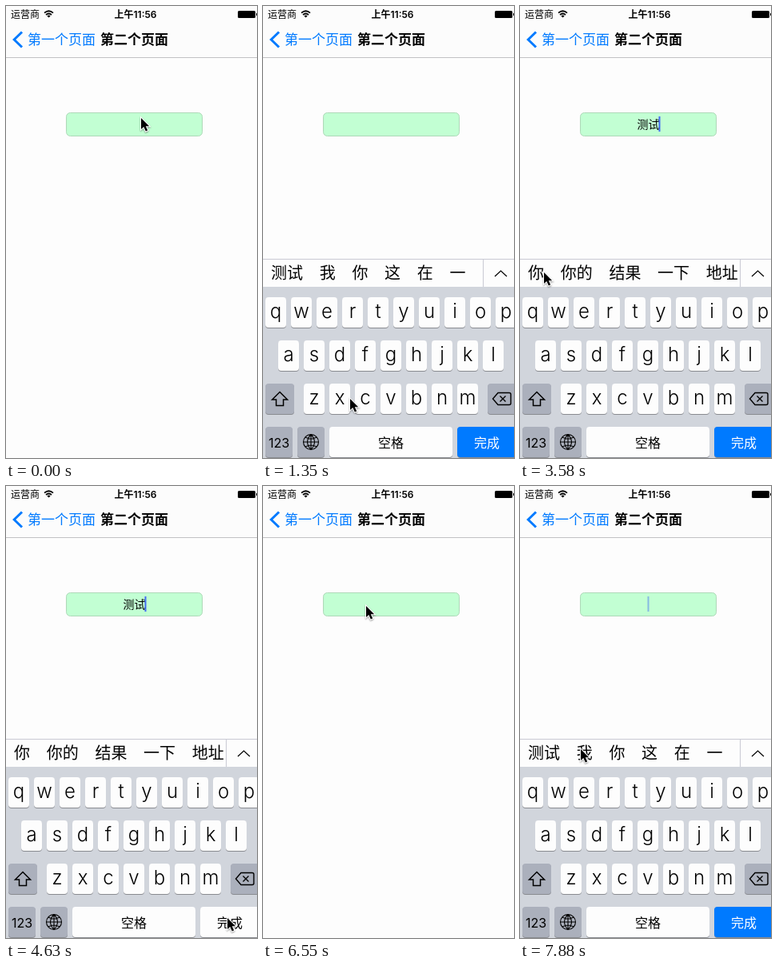
These frames come from a looping animation (314 px wide and 565 px high, 8 s). An HTML page with a canvas:

```html
<!DOCTYPE html>
<html lang="zh-CN">
<head>
<meta charset="utf-8">
<style>
html, body { margin: 0; width: 100%; height: 100%; overflow: hidden; background: #fdfdfd; }
canvas { display: block; width: 314px; height: 565px; }
</style>
</head>
<body>
<canvas id="stage"></canvas>
<script>
const W = 314, H = 565, LOOP = 8000;
const FONT = 'Inter, "Noto Sans CJK SC", "Noto Sans CJK", sans-serif';
const BLUE = '#007aff';
const canvas = document.getElementById('stage');
const ctx = canvas.getContext('2d');
const ratio = window.devicePixelRatio || 1;
canvas.width = W * ratio;
canvas.height = H * ratio;

// Pointer stops: time, x, y
const POINTER = [
  [0, 169, 140], [700, 169, 140], [1340, 109, 491], [1500, 126, 488], [1780, 126, 488],
  [2100, 80, 385], [2320, 80, 385], [2640, 60, 437], [2900, 60, 437], [3300, 30, 333],
  [3600, 30, 333], [4400, 277, 540], [4850, 277, 540], [5500, 159, 243], [5720, 160, 270],
  [6000, 160, 270], [6540, 129, 150], [7400, 129, 150], [7880, 76, 329]
];

// Field states: start, text, composing, candidates
const EDITS = [
  [450, '', false, '测试 我 你 这 在 一'],
  [1760, 'c', true, '从 才 次 车 出 吃 c'],
  [2300, 'ce', true, '测 侧 册 策 厕 恻 ce'],
  [2800, 'ces', true, '测试 厕所 测算 策 册'],
  [3500, '测试', false, '你 你的 结果 一下 地址'],
  [5500, '', false, '测试 我 你 这 在 一'],
  [7290, '', false, '测试 我 你 这 在 一']
];

// Key presses: start, end, letter
const PRESSES = [[1600, 1760, 'c'], [2140, 2300, 'e'], [2600, 2800, 's']];
const ROWS = [['qwertyuiop', 3, 364], ['asdfghjkl', 19, 418], ['zxcvbnm', 51, 472]];

const clamp = v => Math.max(0, Math.min(1, v));
const during = (t, a, b) => t >= a && t < b;
const easeOut = v => 1 - (1 - clamp(v)) ** 3;
const smooth = v => v * v * (3 - 2 * v);

function text(str, x, y, size, color = '#000', align = 'center', weight = 400) {
  ctx.font = `${weight} ${size}px ${FONT}`;
  ctx.textAlign = align;
  ctx.fillStyle = color;
  ctx.fillText(str, x, y);
}

function rect(x, y, w, h, color) {
  ctx.fillStyle = color;
  ctx.fillRect(x, y, w, h);
}

function rounded(x, y, w, h, r, color) {
  ctx.beginPath();
  ctx.roundRect(x, y, w, h, r);
  ctx.fillStyle = color;
  ctx.fill();
}

function line(path, width, color = '#000') {
  ctx.lineWidth = width;
  ctx.strokeStyle = color;
  ctx.stroke(new Path2D(path));
}

function shifted(dx, dy, paint) {
  ctx.save();
  ctx.translate(dx, dy);
  paint();
  ctx.restore();
}

function faded(alpha, paint) {
  ctx.save();
  ctx.globalAlpha *= alpha;
  paint();
  ctx.restore();
}

function drawStatus() {
  text('运营商', 6, 14.5, 12, '#000', 'left');
  text('上午11:56', 162, 14.5, 12, '#000', 'center', 600);
  line('M48 8.6 Q53.5 3.9 59 8.6 M50 11 Q53.5 8 57 11', 1.7);
  ctx.fillStyle = '#000';
  ctx.fill(new Path2D('M53.5 14.6 L51.4 12.4 Q53.5 10.8 55.6 12.4 Z'));
  rounded(290, 6, 22, 9, 1.5, '#000');
  rect(313, 9, 1, 3, '#000');
}

// p: 0 shows the first page, 1 the second
function drawNav(p) {
  rect(0, 0, W, 64, '#fcfcfc');
  rect(0, 64, W, 1, '#c2c2c4');
  drawStatus();
  faded(1 - p, () => text('第一个页面', 160 - 90.5 * p, 48.3, 17, '#000', 'center', 600));
  faded(p, () => {
    line('M20 32.5 L10.2 42 L20 51.5', 3, BLUE);
    text('第一个页面', 118 - 91 * p, 48.3, 17, BLUE, 'left');
    text('第二个页面', 160.5 + 150 * (1 - p), 48.3, 17, '#000', 'center', 600);
  });
}

function drawFirstPage(t) {
  rect(0, 64, 320, H, '#fdfdfd');
  rect(87, 118, 159, 35, '#a8ff60');
  text('测试', 166.5, 142, 17);
  rect(87, 255, 159, 39, '#ffdf99');
  faded(during(t, 5780, 5950) ? 0.3 : 1, () => text('下一页', 166.5, 280.5, 15, BLUE));
}

function drawSecondPage(t, edit, focused) {
  rect(0, 64, 320, H, '#fdfdfd');
  rounded(75.5, 133.5, 170, 29, 5, '#c2ffd3');
  ctx.lineWidth = 1;
  ctx.strokeStyle = '#aed8b8';
  ctx.stroke();
  if (!edit) return;
  const [start, value, composing] = edit;
  ctx.font = `400 14px ${FONT}`;
  const width = ctx.measureText(value).width;
  if (composing) rect(160.5 - width / 2, 139, width, 17, '#9fd3c4');
  text(value, 160.5, 152.7, 14);
  if (!focused) return;
  const phase = (t - start) % 1000;
  faded(clamp((660 - phase) / 160), () => rect(159.5 + width / 2, 138, 2, 19, '#426bf2'));
}

function drawKey(x, y, w, color) {
  rounded(x, y + 1, w, 38, 4, '#898b90');
  rounded(x, y, w, 38, 4, color);
}

function drawPopup(letter, x, y) {
  const c = x + 13;
  const shape = new Path2D(`M${c - 26} ${y - 53} q0 -10 10 -10 h32 q10 0 10 10 v33
    c0 14 -13 12 -13 24 v30 q0 4 -4 4 h-18 q-4 0 -4 -4 v-30 c0 -12 -13 -10 -13 -24 z`);
  ctx.save();
  ctx.shadowColor = 'rgba(0,0,0,.4)';
  ctx.shadowBlur = 3 * ratio;
  ctx.shadowOffsetY = ratio;
  ctx.fillStyle = '#fdfdfd';
  ctx.fill(shape);
  ctx.restore();
  text(letter, c, y - 22, 35, '#000', 'center', 300);
}

function drawCandidates(words) {
  rect(0, 316, 320, 35, '#fdfdfd');
  rect(0, 316, 320, 1, '#c9cad4');
  ctx.save();
  ctx.beginPath();
  ctx.rect(0, 316, 275, 35);
  ctx.clip();
  let x = 10;
  for (const word of words.split(' ')) {
    text(word, x, 341.3, 20, '#000', 'left');
    x += ctx.measureText(word).width + 20.7;
  }
  ctx.restore();
  rect(275, 317, 1, 34, '#c9cad4');
  line('M290 338 L297.5 331 L305 338', 1.2);
}

function drawKeyboard(t, edit) {
  const [, , composing, words] = edit;
  const pressed = PRESSES.find(([a, b]) => during(t, a, b));
  const doneDown = during(t, 4550, 4850);
  const special = '#abb0bc';
  rect(0, 351, 320, 217, '#d1d5dc');
  drawCandidates(words);
  let popup;
  for (const [letters, left, y] of ROWS) {
    [...letters].forEach((letter, i) => {
      const x = left + 32 * i;
      drawKey(x, y, 26, '#fdfdfd');
      text(letter, x + 13, y + 26, 24, '#000', 'center', 300);
      if (pressed && pressed[2] === letter) popup = [letter, x, y];
    });
  }
  drawKey(3, 472, 36, special);
  line('M21 482.5 L30.5 492 H25.5 V499.5 H16.5 V492 H11.5 Z', 1.5);
  drawKey(281, 472, 36, special);
  line('M294 483.5 H308 Q310 483.5 310 485.5 V496.5 Q310 498.5 308 498.5 H294 L287.5 491 Z M296.5 487.5 L303.5 494.5 M303.5 487.5 L296.5 494.5', 1.4);
  drawKey(3, 526, 34, special);
  text('123', 20, 551.5, 16);
  drawKey(43, 526, 34, special);
  line('M50.5 545 a9.5 9.5 0 1 0 19 0 a9.5 9.5 0 1 0 -19 0 H69.5 M60 535.5 V554.5 M60 535.5 Q51 545 60 554.5 Q69 545 60 535.5 M53 539 Q60 543 67 539 M53 551 Q60 547 67 551', 1.1);
  drawKey(83, 526, 154, '#fdfdfd');
  text(composing ? '选定' : '空格', 160, 551.7, 16);
  drawKey(243, 526, 74, doneDown ? '#fdfdfd' : BLUE);
  text(composing ? '确认' : '完成', 280, 551.7, 16, doneDown ? '#000' : '#fff');
  if (popup) drawPopup(...popup);
}

function drawPointer(t) {
  const next = Math.max(1, POINTER.findIndex(stop => stop[0] > t));
  const last = POINTER[POINTER.length - 1];
  let x = last[1], y = last[2];
  if (t < last[0]) {
    const [t0, x0, y0] = POINTER[next - 1];
    const [t1, x1, y1] = POINTER[next];
    const k = smooth((t - t0) / (t1 - t0));
    x = x0 + (x1 - x0) * k;
    y = y0 + (y1 - y0) * k;
  }
  shifted(x, y, () => {
    const arrow = new Path2D('M0 0 V14 L3.3 11 L5.8 16.6 L8.2 15.5 L5.8 10.2 H10.2 Z');
    ctx.save();
    ctx.shadowColor = 'rgba(0,0,0,.4)';
    ctx.shadowBlur = 2 * ratio;
    ctx.shadowOffsetY = ratio;
    ctx.lineWidth = 2;
    ctx.strokeStyle = '#fff';
    ctx.stroke(arrow);
    ctx.restore();
    ctx.fillStyle = '#000';
    ctx.fill(arrow);
  });
}

function draw(t) {
  ctx.setTransform(ratio, 0, 0, ratio, 0, 0);
  const pop = easeOut((t - 4800) / 430);
  const push = easeOut((t - 5900) / 450);
  const page = t < 5600 ? 1 - pop : push;
  const slide = 320 * (1 - page);
  const edit = EDITS.filter(e => e[0] <= t).pop();
  const focused = during(t, 450, 5300) || t >= 7290;
  const rise = easeOut((t - (t < 5600 ? 450 : 7290)) / 400);

  if (page < 1) {
    shifted(-96 * page, 0, () => drawFirstPage(t));
    if (page > 0) rect(0, 64, W, H, `rgba(0,0,0,${0.1 * page})`);
  }
  if (page > 0) shifted(slide, 0, () => drawSecondPage(t, edit, focused));
  drawNav(page);
  if (focused && page > 0) shifted(slide, 252 * (1 - rise), () => drawKeyboard(t, edit));
  drawPointer(t);
}

const STEP = 148.5;
function tick(now) {
  const t = now % LOOP;
  draw(t < 450 ? 0 : Math.min(7880, 450 + STEP * Math.floor((t - 450) / STEP)));
  requestAnimationFrame(tick);
}
requestAnimationFrame(tick);
</script>
</body>
</html>
```
